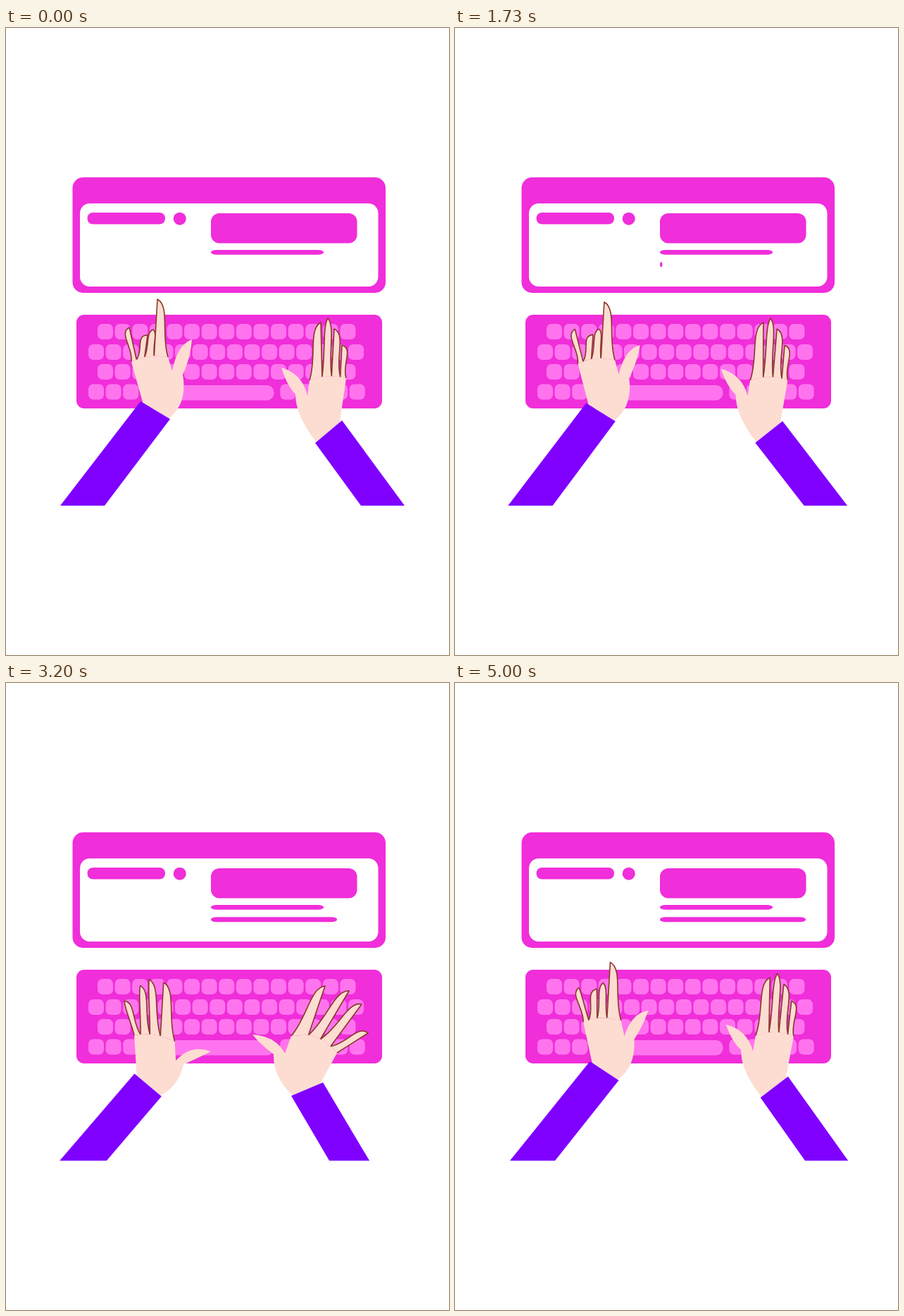
An HTML page that plays this animation: 629 px wide and 890 px high, repeating every 5.03 s.

```html
<!DOCTYPE html>
<html lang="en">
<head>
<meta charset="utf-8">
<title>Typing hands</title>
<style>
  html, body { margin: 0; width: 100%; height: 100%; overflow: hidden; background: #fff; }
  svg { display: block; width: 629px; height: 890px; }
  .main { fill: #f02eda; }
  .key { fill: #ff74ee; }
  .skin { fill: #fdddd1; }
  .finger { fill: #fdddd1; stroke: #87392a; stroke-width: 1.6; stroke-linejoin: round; }
  .sleeve { fill: #8000ff; }
</style>
</head>
<body>
<svg id="stage" viewBox="0 0 629 890">
  <rect class="main" x="94.5" y="212" width="444.5" height="164" rx="15"/>
  <rect x="105" y="249" width="423.5" height="118" rx="14" fill="#fff"/>
  <rect class="main" x="115.5" y="262" width="110.5" height="16.5" rx="8"/>
  <circle class="main" cx="246.7" cy="270.7" r="9"/>
  <rect class="main" x="291" y="263" width="207.5" height="42.5" rx="12"/>
  <rect class="main" x="291" y="315" width="160" height="6.8" rx="8" ry="3.2"/>
  <rect class="main" id="typed" x="291" y="332.3" width="0" height="7" rx="8" ry="3.2"/>
  <rect class="main" x="100" y="407" width="434" height="133" rx="11"/>
  <g id="keys"></g>
</svg>
<script>
const LOOP = 5030, STEPS = 14, LINE = 207;
const stage = document.getElementById('stage');
const typed = document.getElementById('typed');

function add(parent, tag, attrs) {
  const el = document.createElementNS('http://www.w3.org/2000/svg', tag);
  for (const name in attrs) el.setAttribute(name, attrs[name]);
  return parent.appendChild(el);
}

// Keyboard
const keys = document.getElementById('keys');
function keyRow(x, y, count) {
  for (let i = 0; i < count; i++)
    add(keys, 'rect', { class: 'key', x: x + i * 24.6, y, width: 22, height: 22, rx: 7 });
}
keyRow(130, 420, 15);
keyRow(117, 449, 16);
keyRow(130, 477, 15);
keyRow(117, 505.5, 3);
keyRow(389.3, 505.5, 5);
add(keys, 'rect', { class: 'key', x: 191, y: 507, width: 189.5, height: 21.5, rx: 10 });

// Easing helpers
const smooth = u => u * u * (3 - 2 * u);
const mix = (a, b, u) => Array.isArray(a) ? a.map((v, i) => mix(v, b[i], u)) : a + (b - a) * u;

// Steady rise up to the peak step, then an eased fall
function pulse(step, peak, fall) {
  if (step <= peak) return step / peak;
  return smooth(Math.max(0, (peak + fall - step) / fall));
}

// Each hand blends between a reaching and a spread pose while swaying sideways.
// Points run from the thumb side outwards; thumb: root, curve, tip, curve, web.
const leftHand = {
  side: 1, lag: 1,
  open: step => pulse(step, 11, 3),
  sway: step => -40 * pulse(step, 8, 3),
  reach: {
    cuff: [[233, 555], [191, 530]], hem: [140, 77], heel: [258, 533],
    thumb: [[251, 492], [262, 468], [264, 442], [243, 450], [236, 487]],
    knuckles: [[230, 467], [202, 461], [178, 474]],
    tips: [[215, 385], [209, 428], [201, 436], [175, 425]]
  },
  spread: {
    cuff: [[231, 590], [193, 557]], hem: [148, 81], heel: [254, 578],
    thumb: [[264, 546], [280, 541], [305, 531], [275, 519], [253, 541]],
    knuckles: [[252, 513], [224, 497], [194, 503]],
    tips: [[236, 429], [214, 420], [201, 429], [179, 454]]
  }
};
const rightHand = {
  side: -1, lag: 2,
  open: step => pulse(step, 10, 4),
  sway: step => -30 * Math.max(0, Math.sin(Math.PI * step / 10)),
  reach: {
    cuff: [[439, 589], [477, 557]], hem: [504, 566], heel: [411, 550],
    thumb: [[411, 520], [399, 508], [391, 482], [421, 491], [428, 522]],
    knuckles: [[431, 500], [455, 490], [483, 497]],
    tips: [[447, 418], [457, 412], [466, 427], [477, 450]]
  },
  spread: {
    cuff: [[405, 586], [450, 567]], hem: [459, 516], heel: [379, 559],
    thumb: [[380, 527], [362, 514], [350, 499], [383, 501], [396, 526]],
    knuckles: [[405, 501], [440, 491], [470, 525]],
    tips: [[453, 430], [487, 437], [505, 456], [514, 497]]
  }
};

const SPLITS = [0, 0.36, 0.62, 0.85, 1];
const FOLDS = [0, 0.6, 1, 1];

const onArc = ([a, c, b], u) => mix(mix(a, c, u), mix(c, b, u), u);

// Edge from knuckle to tip: slim at the root, with a shoulder near the tip
function edgeControls(base, tip, normal, bulge) {
  const at = (u, out) => mix(base, tip, u).map((v, i) => v + normal[i] * out * bulge);
  return [at(0.4, -4), at(0.87, 16)];
}

function fingerPath(near, far, tip, side, fold) {
  const root = mix(near, far, 0.5);
  const dx = tip[0] - root[0], dy = tip[1] - root[1];
  const scale = side / Math.hypot(dx, dy);
  const normal = [-dy * scale, dx * scale];
  const [a, b] = edgeControls(near, tip, normal, 1 - fold);
  const [d, c] = edgeControls(far, tip, normal, -fold);
  return `M${near}C${a} ${b} ${tip}C${c} ${d} ${far}`;
}

function makeHand(hand) {
  const g = add(stage, 'g', {});
  const palm = add(g, 'path', { class: 'skin' });
  const fingers = FOLDS.map(() => add(g, 'path', { class: 'finger' })).reverse();
  const sleeve = add(g, 'path', { class: 'sleeve' });

  return step => {
    const u = hand.open(step), sway = hand.sway(step);
    const part = (name, amount = u) => mix(hand.reach[name], hand.spread[name], amount);
    const [inner, outer] = part('cuff');
    const [root, low, tip, high, web] = part('thumb');
    const arc = part('knuckles');
    const bases = SPLITS.map(s => onArc(arc, s));
    const tips = part('tips', u ** hand.lag);
    const hem = part('hem').map(x => x - sway * 0.58);

    g.setAttribute('transform', `translate(${sway} 0)`);
    palm.setAttribute('d', `M${mix(inner, outer, 0.04)}Q${part('heel')} ${root}Q${low} ${tip}` +
      `Q${high} ${web}L${bases.join('L')}L${mix(outer, inner, 0.08)}Z`);
    fingers.forEach((el, i) => el.setAttribute('d',
      fingerPath(bases[i], bases[i + 1], tips[i], hand.side, FOLDS[i] * (1 - u * u))));
    sleeve.setAttribute('d', `M${inner}L${outer}L${hem[1]},678L${hem[0]},678Z`);
  };
}

const hands = [leftHand, rightHand].map(makeHand);
let shown = -1;

function draw(now) {
  // 25 poses a second, held on a 30 Hz clock
  const tick = Math.floor((now % LOOP + 3.4) * 0.03);
  const step = Math.floor(tick * 5 / 6) % STEPS;
  if (step === shown) return;
  shown = step;
  hands.forEach(pose => pose(step));
  typed.setAttribute('width', LINE * smooth(step / (STEPS - 1)));
}

const start = performance.now();
function loop() {
  draw(performance.now() - start);
  requestAnimationFrame(loop);
}
loop();
</script>
</body>
</html>
```
